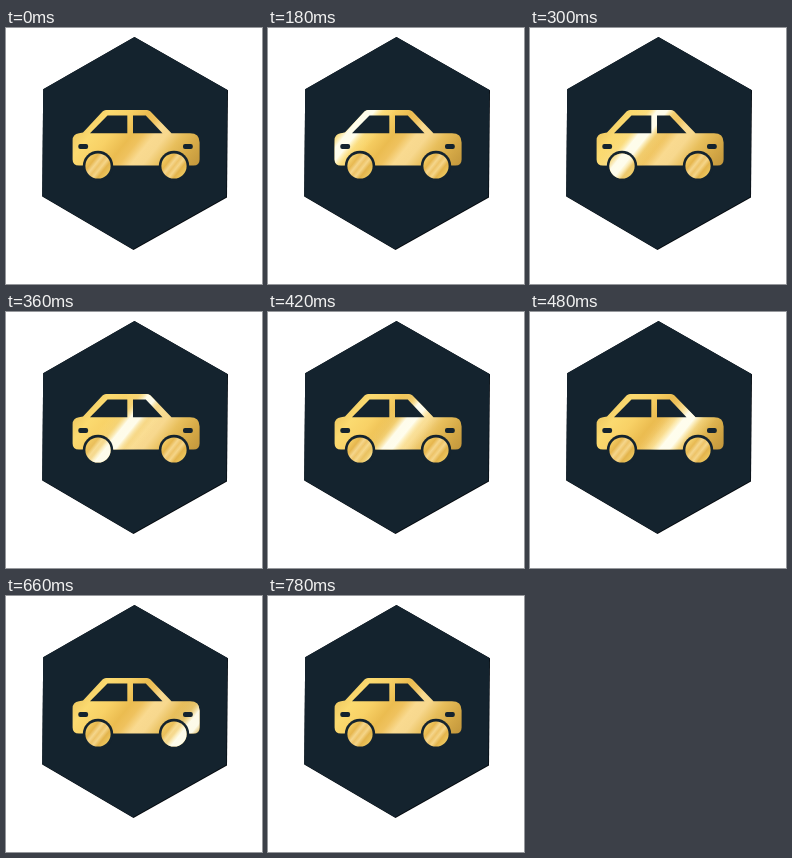
Animation, 256 px wide and 256 px high, one loop 2700 ms. Source, as an HTML page with a canvas:

```html
<!DOCTYPE html>
<html>
<head>
<meta charset="utf-8">
<style>
html, body { margin: 0; width: 100%; height: 100%; overflow: hidden; background: #fff; }
canvas { display: block; width: 256px; height: 256px; }
</style>
</head>
<body>
<canvas id="stage"></canvas>
<script>
const LOOP = 2700, STEP = 30, SLANT = 0.8;
const NAVY = '#14232e', SHADE = '#060b10';
const canvas = document.getElementById('stage');
const ctx = canvas.getContext('2d');
const dpr = window.devicePixelRatio || 1;
canvas.width = canvas.height = 256 * dpr;

function polygon(points) {
  const p = new Path2D();
  points.forEach(([x, y], i) => i ? p.lineTo(x, y) : p.moveTo(x, y));
  p.closePath();
  return p;
}

function disc(x, y, r) {
  const p = new Path2D();
  p.arc(x, y, r, 0, Math.PI * 2);
  return p;
}

function pill(x, y, w, h, r) {
  const p = new Path2D();
  p.roundRect(x, y, w, h, r);
  return p;
}

// Slanted gradient: each stop is placed on the line x + SLANT * y = c
function bands(stops) {
  const n = 1 + SLANT * SLANT;
  const from = stops[0][0], to = stops[stops.length - 1][0];
  const g = ctx.createLinearGradient(from / n, from * SLANT / n, to / n, to * SLANT / n);
  stops.forEach(([c, color]) => g.addColorStop((c - from) / (to - from), color));
  return g;
}

function fill(path, style) {
  ctx.fillStyle = style;
  ctx.fill(path);
}

const hexagon = polygon([[128.5, 9], [222, 62.3], [221, 169.5], [127.5, 222], [36.2, 168.5], [37.2, 61.3]]);
const body = new Path2D(
  'M73 105.3 L77 104.5 L96.5 83.6 Q98 82 100 82 H141 Q143 82 144.5 83.5 ' +
  'L165.5 105.2 H184 Q193.6 105.2 193.6 114.5 V131.5 Q193.6 137.6 187.5 137.6 H73 ' +
  'Q66.6 137.6 66.6 131.5 V112.5 Q66.6 106 73 105.3 Z');
const windows = [
  polygon([[84, 105.2], [101.5, 87.5], [121.3, 87.5], [121.3, 105.2]]),
  polygon([[127, 87.5], [139.8, 87.5], [156.5, 105.2], [127, 105.2]])
];
const lamps = [pill(72.3, 115.9, 9.8, 5, 2), pill(177, 115.9, 9.8, 5, 2)];
const hubs = [92, 168];

const bodyGold = bands([
  [148, '#ecc55e'], [170, '#fbda70'], [190, '#f8d166'], [211, '#ebbc50'],
  [222, '#efc25e'], [234, '#f9da90'], [246, '#f7d88e'], [262, '#e8bf5c'],
  [280, '#d7ab48'], [302, '#c3973c']
]);

function wheelGold(x) {
  const c = x + SLANT * 138;
  return bands([
    [c - 16, '#f3cb62'], [c - 9, '#e6b64e'], [c - 4, '#f5d68c'], [c, '#edc368'],
    [c + 4, '#f5d588'], [c + 9, '#e3b44c'], [c + 16, '#edc75e']
  ]);
}

function glint(c) {
  return bands([
    [c - 28, 'rgba(255,236,150,0)'], [c - 14, 'rgba(255,240,175,.3)'],
    [c - 5, 'rgba(255,255,242,.95)'], [c + 5, 'rgba(255,255,242,.95)'],
    [c + 14, 'rgba(255,240,175,.3)'], [c + 28, 'rgba(255,236,150,0)']
  ]);
}

function draw(t) {
  ctx.setTransform(dpr, 0, 0, dpr, 0, 0);
  ctx.fillStyle = '#fff';
  ctx.fillRect(0, 0, 256, 256);

  fill(hexagon, SHADE);
  ctx.save();
  ctx.clip(hexagon);
  ctx.translate(-0.7, -0.8);
  fill(hexagon, NAVY);
  ctx.restore();

  const shine = t >= 120 && t < 780 ? glint(168 + 0.254 * (t - 180)) : null;
  const gild = (path, gold) => {
    fill(path, gold);
    if (shine) fill(path, shine);
  };

  gild(body, bodyGold);
  windows.concat(lamps).forEach(p => fill(p, NAVY));
  hubs.forEach(x => {
    fill(disc(x, 138, 15.2), NAVY);
    gild(disc(x, 138, 12.6), wheelGold(x));
  });
}

function tick() {
  const t = performance.now() % LOOP;
  draw(Math.floor(t / STEP) * STEP);
  requestAnimationFrame(tick);
}
tick();
</script>
</body>
</html>
```
